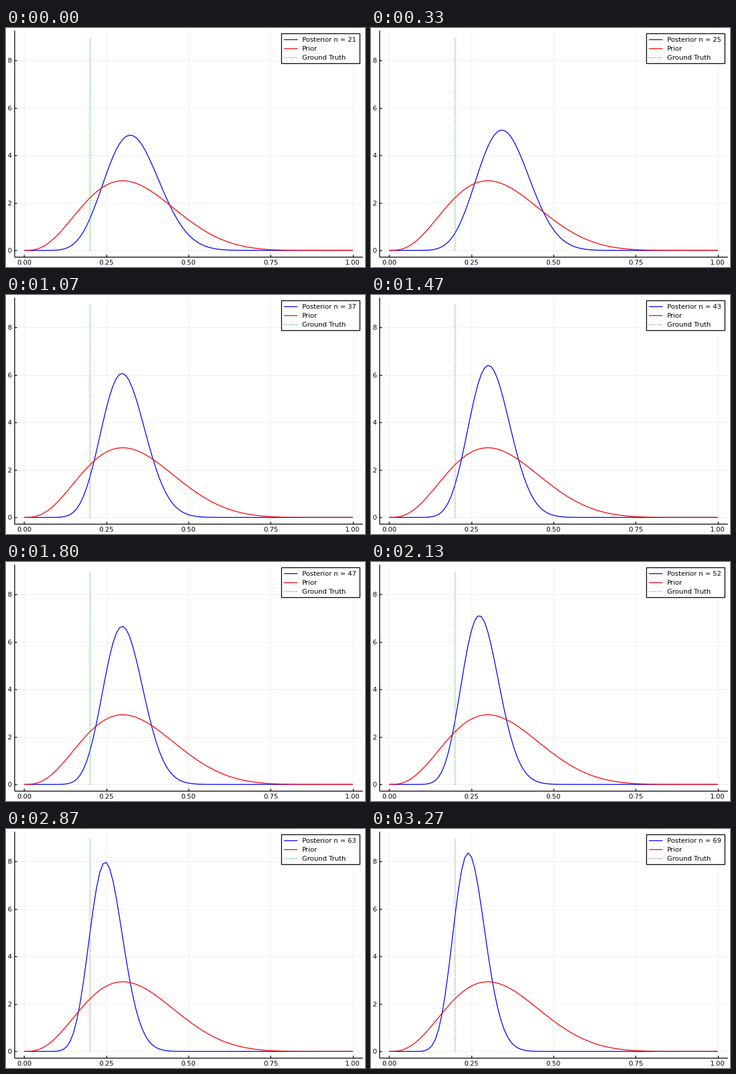
A matplotlib script for the animation above (3340 ms loop, 600 by 400 pixels).

```python
import math

import matplotlib.pyplot as plt
import numpy as np
from matplotlib.animation import FuncAnimation
from matplotlib.patches import Rectangle

LOOP_MS, FRAMES = 3340, 50
WIDTH, HEIGHT, DPI = 600, 400, 100
LEFT, RIGHT, TOP, BOTTOM = 14, 596, 4, 383
BLUE, RED, GREEN = "#0000ff", "#ff0000", "#3da44d"
DOTTED = (0, (1, 1.4))

# Coin tosses: 7 heads in the first 21, then heads at these tosses.
FIRST_N, FIRST_HEADS = 21, 7
HEADS_AT = (23, 25, 28, 35, 41, 43, 47, 62, 67, 70)
PRIOR_A, PRIOR_B = 4, 8

plt.rcParams.update({"font.family": "DejaVu Sans", "font.size": 8})
grid_x = np.linspace(0, 1, 101)


def px(x):
    return LEFT + (x + 0.03) / 1.06 * (RIGHT - LEFT)


def py(y):
    return BOTTOM - (y + 0.27) / 9.54 * (BOTTOM - TOP)


def beta_pdf(a, b):
    scale = math.exp(math.lgamma(a + b) - math.lgamma(a) - math.lgamma(b))
    return scale * grid_x ** (a - 1) * (1 - grid_x) ** (b - 1)


fig = plt.figure(figsize=(WIDTH / DPI, HEIGHT / DPI), dpi=DPI, facecolor="white")
ax = fig.add_axes([0, 0, 1, 1])
ax.set(xlim=(0, WIDTH), ylim=(HEIGHT, 0))
ax.axis("off")


def line(xs, ys, color="black", width=1.0, **style):
    style = {"solid_capstyle": "butt", "dash_capstyle": "butt", **style}
    return ax.plot(xs, ys, color=color, lw=width, **style)[0]


def label(x, y, text, align):
    return ax.text(x, y, text, ha=align, va="center_baseline")


# Grid, ticks and axes
for value in (0, 0.25, 0.5, 0.75, 1):
    x = px(value)
    line([x, x], [TOP, BOTTOM], width=0.5, alpha=0.1)
    line([x, x], [BOTTOM - 4, BOTTOM])
    label(x, 392.5, f"{value:.2f}", "center")
for value in (0, 2, 4, 6, 8):
    y = py(value)
    line([LEFT, RIGHT], [y, y], width=0.5, alpha=0.1)
    line([LEFT, LEFT + 4], [y, y])
    label(9.5, y, str(value), "right")
line([LEFT, LEFT], [TOP, BOTTOM])
line([LEFT, RIGHT], [BOTTOM, BOTTOM])

# Curves
posterior = line(px(grid_x), py(0 * grid_x), BLUE)
line(px(grid_x), py(beta_pdf(PRIOR_A, PRIOR_B)), RED)
line([px(0.2)] * 2, [py(0), py(9)], GREEN, linestyle=DOTTED)

# Legend
ax.add_patch(Rectangle((460, 9), 131, 50, fc="white", ec="black", lw=1, zorder=3))
entries = ((19, BLUE, "-", ""), (34, RED, "-", "Prior"),
           (49, GREEN, DOTTED, "Ground Truth"))
legend_texts = []
for y, color, dash, text in entries:
    line([464, 487], [y, y], color, linestyle=dash, zorder=4)
    legend_texts.append(label(495, y, text, "left"))
    legend_texts[-1].set_zorder(4)


def update(frame):
    n = FIRST_N + frame
    heads = FIRST_HEADS + sum(toss <= n for toss in HEADS_AT)
    posterior.set_ydata(py(beta_pdf(PRIOR_A + heads, PRIOR_B + n - heads)))
    legend_texts[0].set_text(f"Posterior n = {n}")
    return posterior, legend_texts[0]


animation = FuncAnimation(fig, update, frames=FRAMES, interval=LOOP_MS / FRAMES,
                          repeat=True, repeat_delay=0)
plt.show()
```
